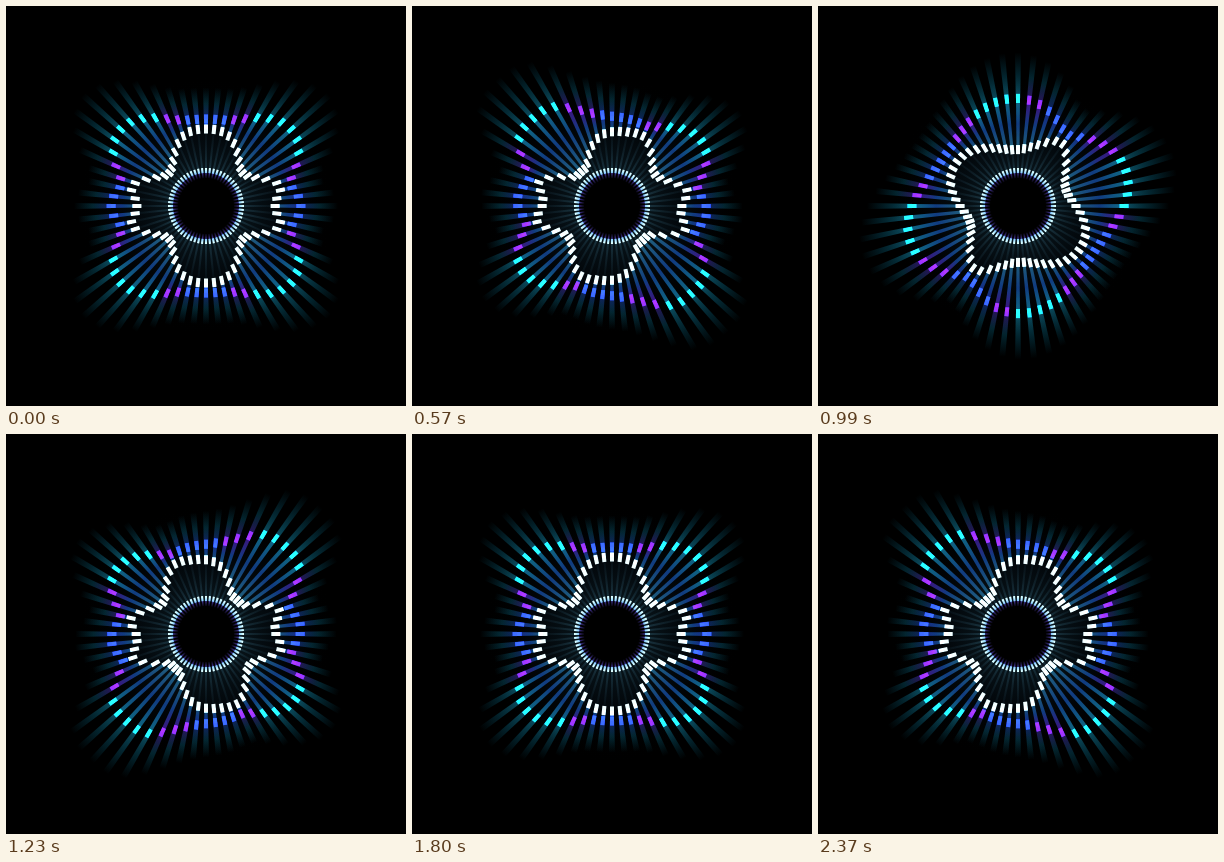
An HTML page with a canvas that plays this animation: 400 by 400 pixels, repeating every 2400 ms.

```html
<!DOCTYPE html>
<html>
<head>
<meta charset="utf-8">
<title>Pulse ring</title>
<style>
html, body { margin: 0; width: 100%; height: 100%; overflow: hidden; background: #000; }
canvas { display: block; width: 400px; height: 400px; }
</style>
</head>
<body>
<canvas id="stage" width="400" height="400"></canvas>
<script>
const ctx = document.getElementById('stage').getContext('2d');
const BARS = 60, MID = 82, PERIOD = 600, STEP = 30;
const TAU = Math.PI * 2;

// Odd angular harmonics: [k, constant, cos w, cos 2w, sin w, sin 2w]
const WAVES = [
  [1, 18.6, 1.8, -3.8, 18.3, 4.8],
  [3, -4.4, -19, 6.6, -15.8, 3.2],
  [5, -4.1, -6.7, -0.9, -7.5, -5.4]
];
const CYAN = [30, 205, 255], PURPLE = [120, 35, 245], BLUE = [45, 75, 250];

function spread(a, w) {
  let sum = 0;
  for (const [k, c0, c1, c2, s1, s2] of WAVES) {
    sum += Math.cos(k * a) * (c0 + c1 * Math.cos(w) + c2 * Math.cos(2 * w));
    sum += Math.sin(k * a) * (s1 * Math.sin(w) + s2 * Math.sin(2 * w));
  }
  return Math.min(36, Math.hypot(sum, 5));
}

function tint(a, w) {
  const p = (1 - Math.cos(4 * a - w)) / 2;
  return p > 0.72 ? CYAN : p > 0.25 ? PURPLE : BLUE;
}

const rgba = (c, alpha) => `rgba(${c[0]},${c[1]},${c[2]},${alpha})`;

// Radial stroke along the x axis of the rotated frame
function stroke(from, to, width, stops) {
  const g = ctx.createLinearGradient(from, 0, to, 0);
  stops.forEach((s, i) => g.addColorStop(i / (stops.length - 1), s));
  ctx.fillStyle = g;
  ctx.fillRect(from, -width / 2, to - from, width);
}

function wedge(from, to, w0, w1, stops) {
  const g = ctx.createLinearGradient(from, 0, to, 0);
  stops.forEach((s, i) => g.addColorStop(i / (stops.length - 1), s));
  ctx.fillStyle = g;
  ctx.beginPath();
  ctx.moveTo(from, -w0 / 2);
  ctx.lineTo(to, -w1 / 2);
  ctx.lineTo(to, w1 / 2);
  ctx.lineTo(from, w0 / 2);
  ctx.fill();
}

function mark(r, color) {
  ctx.fillStyle = color;
  ctx.fillRect(r - 4.5, -2, 9, 4);
}

function drawBar(a, w) {
  const gap = spread(a, w);
  const inner = MID - gap, outer = MID + gap;
  const c = tint(a, w);
  const teal = [10, 130, 165];
  const far = outer + 28 + gap * 0.7;
  ctx.save();
  ctx.rotate(-a);
  wedge(outer, far, 4.5, 6, [rgba(c, 0.4), rgba(teal, 0.28), rgba(teal, 0)]);
  stroke(38, inner, 2, ['rgba(60,110,130,0.28)', 'rgba(30,60,75,0.1)']);
  wedge(inner, outer, 3, 4, ['rgba(50,150,190,0.55)', 'rgba(25,90,200,0.6)', rgba(c, 0.5)]);
  mark(outer, rgba(c, 1));
  mark(inner, '#f0ffff');
  ctx.restore();
}

function drawRing() {
  for (let i = 0; i < BARS; i++) {
    ctx.save();
    ctx.rotate(i / BARS * TAU);
    stroke(28, 33, 1.5, ['rgba(50,40,110,0.2)', 'rgba(90,70,200,0.8)']);
    stroke(33, 38, 2.1, ['#78b4e6', '#e6ffff']);
    ctx.restore();
  }
}

function drawGlow() {
  const g = ctx.createRadialGradient(0, 0, 34, 0, 0, 130);
  g.addColorStop(0, 'rgba(20,50,65,0.4)');
  g.addColorStop(0.4, 'rgba(8,25,38,0.3)');
  g.addColorStop(1, 'rgba(0,0,0,0)');
  ctx.fillStyle = g;
  ctx.fillRect(-200, -200, 400, 400);
  ctx.fillStyle = '#000';
  ctx.beginPath();
  ctx.arc(0, 0, 33, 0, TAU);
  ctx.fill();
}

function draw(time) {
  const w = Math.floor(time / STEP) * STEP / PERIOD * TAU;
  ctx.setTransform(1, 0, 0, 1, 0, 0);
  ctx.globalCompositeOperation = 'source-over';
  ctx.fillStyle = '#000';
  ctx.fillRect(0, 0, 400, 400);
  ctx.translate(200, 200);
  drawGlow();
  ctx.globalCompositeOperation = 'lighter';
  for (let i = 0; i < BARS; i++) drawBar(i / BARS * TAU, w);
  drawRing();
}

let start = null;
function tick(now) {
  if (start === null) start = now;
  draw((now - start) % 2400);
  requestAnimationFrame(tick);
}
draw(0);
requestAnimationFrame(tick);
</script>
</body>
</html>
```
